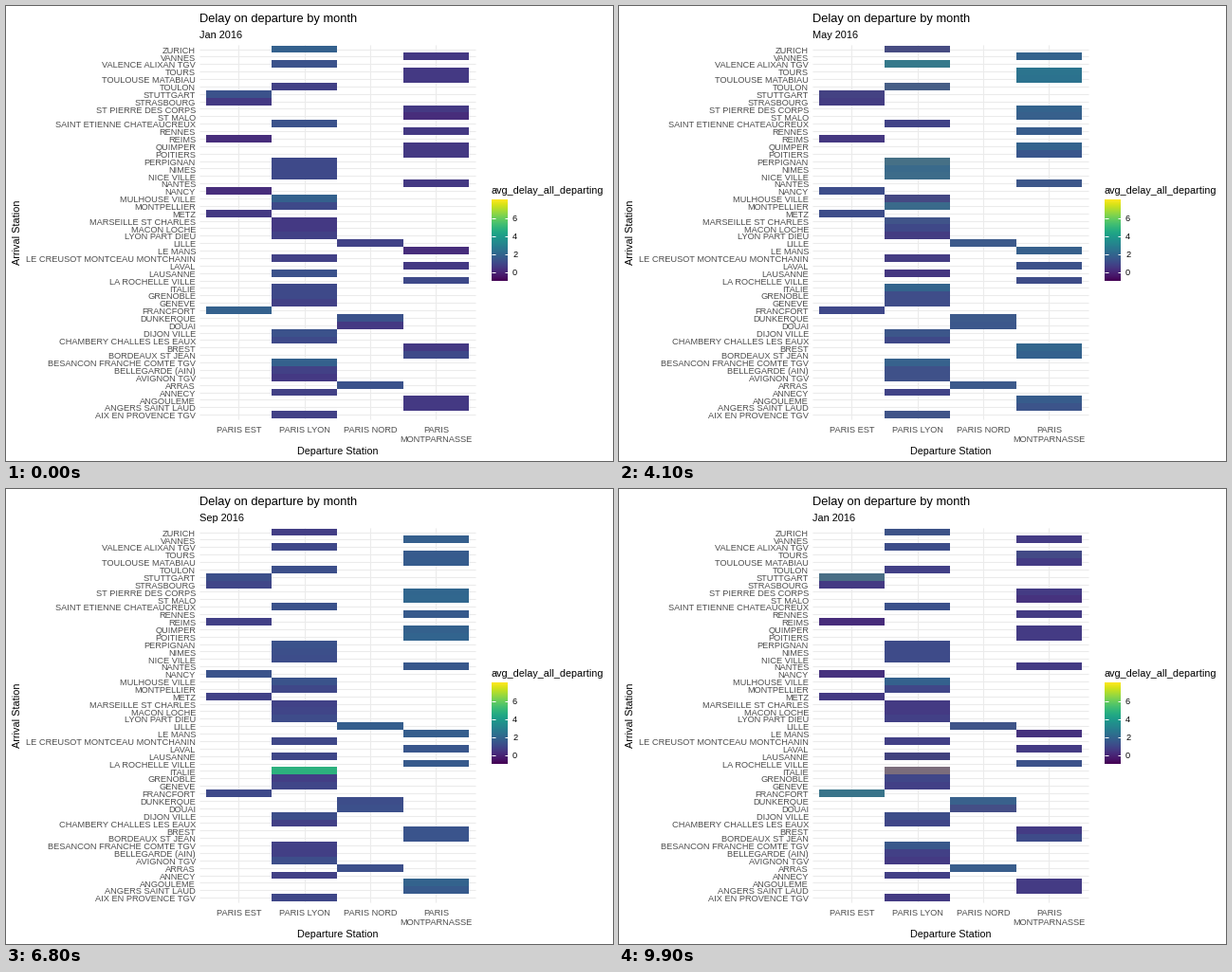
Animation, 640 px wide and 480 px high, one loop 10000 ms. Source, as a matplotlib script:

```python
import random

import matplotlib.pyplot as plt
import numpy as np
from matplotlib.animation import FuncAnimation
from matplotlib.collections import LineCollection, PatchCollection
from matplotlib.patches import Rectangle

W, H, DPI = 640, 480, 100
FRAMES, INTERVAL = 100, 100
PX = 72 / DPI
LOW, HIGH = -1.0, 8.1

MONTHS = "Jan Feb Mar Apr May Jun Jul Aug Sep Oct Nov Dec".split()
STARTS = [5, 14, 23, 32, *range(41, 98, 8)]  # first frame of each transition
STEPS = 4

DEPARTURES = [
    ("PARIS EST", "FRANCFORT,METZ,NANCY,REIMS,STRASBOURG,STUTTGART"),
    ("PARIS LYON",
     "AIX EN PROVENCE TGV,ANNECY,AVIGNON TGV,BELLEGARDE (AIN),"
     "BESANCON FRANCHE COMTE TGV,CHAMBERY CHALLES LES EAUX,DIJON VILLE,"
     "GENEVE,GRENOBLE,ITALIE,LAUSANNE,LE CREUSOT MONTCEAU MONTCHANIN,"
     "LYON PART DIEU,MACON LOCHE,MARSEILLE ST CHARLES,MONTPELLIER,"
     "MULHOUSE VILLE,NICE VILLE,NIMES,PERPIGNAN,"
     "SAINT ETIENNE CHATEAUCREUX,TOULON,VALENCE ALIXAN TGV,ZURICH"),
    ("PARIS NORD", "ARRAS,DOUAI,DUNKERQUE,LILLE"),
    ("PARIS\nMONTPARNASSE",
     "ANGERS SAINT LAUD,ANGOULEME,BORDEAUX ST JEAN,BREST,"
     "LA ROCHELLE VILLE,LAVAL,LE MANS,NANTES,POITIERS,QUIMPER,RENNES,"
     "ST MALO,ST PIERRE DES CORPS,TOULOUSE MATABIAU,TOURS,VANNES"),
]
COLUMN = {s: c for c, (_, names) in enumerate(DEPARTURES)
          for s in names.split(",")}
STATIONS = sorted(COLUMN)

# usual delay per departure station, then the arrivals that differ
DELAYS = {
    "Jan": ((.5, .75, .8, .5), {
        1.8: "ZURICH,MULHOUSE,BESANCON,FRANCFORT",
        1.3: "VALENCE,STUTTGART,SAINT,LAUSANNE,DIJON,DUNKERQUE,ARRAS",
        1.0: "PERPIGNAN,NIMES,NICE,MONTPELLIER,CHAMBERY,GRENOBLE,ITALIE,"
             "LA ROCHELLE,BORDEAUX",
        .5: "MARSEILLE,DOUAI,AVIGNON,MACON",
        .15: "REIMS,NANCY,ST MALO,LE MANS"}),
    "Mar": ((1.5, .4, 2.2, 1.2), {
        2.5: "TOULOUSE,DUNKERQUE",
        1.9: "ITALIE,LA ROCHELLE",
        1.7: "LILLE,DOUAI,NANCY,METZ",
        1.2: "ZURICH,VALENCE,STUTTGART,STRASBOURG,PERPIGNAN,NIMES,CHAMBERY",
        .7: "NICE,FRANCFORT,GRENOBLE,MULHOUSE,MONTPELLIER",
        .15: "SAINT,LAUSANNE,ANNECY"}),
    "May": ((.35, .8, 1.05, 1.4), {
        2.5: "TOURS,TOULOUSE",
        2.0: "VALENCE,ITALIE",
        1.7: "ST PIERRE,BREST,BORDEAUX,VANNES,QUIMPER",
        1.45: "PERPIGNAN,NIMES,NICE,MONTPELLIER,BESANCON",
        1.0: "NANCY,METZ,FRANCFORT,DIJON,LAVAL,ANGERS,NANTES",
        .3: "ZURICH,MULHOUSE,LYON,LE CREUSOT,LAUSANNE"}),
    "Jun": ((1.5, 2.7, 3.2, 2.4), {
        5.5: "PERPIGNAN",
        4.75: "VALENCE,TOULON,NICE",
        4.3: "NIMES,MONTPELLIER",
        3.8: "ZURICH",
        3.15: "MULHOUSE,MARSEILLE,BESANCON,AIX",
        2.85: "LE MANS,BREST,ST MALO,NANTES,DOUAI",
        2.15: "STUTTGART,GRENOBLE,GENEVE,TOULOUSE,BORDEAUX,LAVAL",
        1.55: "MACON,LYON,LE CREUSOT,ITALIE,CHAMBERY,POITIERS",
        .85: "SAINT,REIMS,LAUSANNE,FRANCFORT,ANNECY",
        .2: "LA ROCHELLE"}),
    "Jul": ((.95, 1.35, 1.5, 1.25), {
        5.1: "ITALIE",
        4.3: "GRENOBLE",
        3.6: "CHAMBERY",
        2.8: "ARRAS",
        2.25: "TOULOUSE,TOULON,PERPIGNAN,NIMES,NICE",
        1.75: "ZURICH,VALENCE,MARSEILLE,AIX,BREST,BORDEAUX,MONTPELLIER,"
              "DUNKERQUE",
        1.3: "STUTTGART",
        .9: "MACON,LYON,AVIGNON,ANNECY",
        .5: "TOURS,REIMS,METZ,LE CREUSOT,LAUSANNE"}),
    "Aug": ((.8, 1.0, 1.1, 1.3), {1.8: "ITALIE,GRENOBLE,CHAMBERY"}),
    "Sep": ((1.0, 1.0, 1.4, 1.7), {4.8: "ITALIE"}),
    "Oct": ((1.4, 1.2, 2.6, 2.1), {3.3: "FRANCFORT,TOULOUSE,TOURS"}),
    "Nov": ((1.4, 1.1, .3, 2.3), {
        3.5: "TOULOUSE",
        3.1: "TOURS",
        2.7: "NANTES,LE MANS,LA ROCHELLE,ANGERS",
        2.3: "GRENOBLE",
        1.9: "FRANCFORT,LAVAL,ANGOULEME",
        1.65: "TOULON,SAINT,NICE,AIX",
        1.4: "PERPIGNAN,NIMES,MONTPELLIER,MARSEILLE,LYON",
        .8: "LILLE,LE CREUSOT,CHAMBERY,ANNECY,BELLEGARDE",
        .45: "METZ,ITALIE",
        .1: "REIMS"}),
    "Dec": ((.6, .6, 3.4, .8), {
        8.1: "ITALIE",
        5.6: "STUTTGART",
        4.8: "FRANCFORT",
        2.8: "TOURS,ARRAS",
        2.2: "LA ROCHELLE",
        1.8: "MULHOUSE",
        1.2: "PERPIGNAN,NIMES,NICE,SAINT,BORDEAUX",
        0: "ZURICH,AIX,REIMS",
        -.9: "LAUSANNE"}),
}
JITTERY = {"Aug", "Sep", "Oct"}


def month_delays(month, rng):
    usual, special = DELAYS[month]
    spread = .35 if month in JITTERY else 0
    out = []
    for s in STATIONS:
        value = usual[COLUMN[s]] + rng.uniform(-spread, spread)
        for level, names in special.items():
            if s.startswith(tuple(names.split(","))):
                value = level
        out.append(value)
    return np.array(out)


def all_delays():
    rng = random.Random(16)
    table = {m: month_delays(m, rng) for m in DELAYS}
    for before, month, after in (("Jan", "Feb", "Mar"), ("Mar", "Apr", "May")):
        noise = np.array([rng.uniform(-.2, .2) for _ in STATIONS])
        table[month] = .35 * table[before] + .65 * table[after] + noise
    return [table[m] for m in MONTHS]


# colours blend in CIE Lab
TO_XYZ = np.array([[.4124, .3576, .1805],
                   [.2126, .7152, .0722],
                   [.0193, .1192, .9505]])
WHITE = TO_XYZ.sum(axis=1)
TO_LAB = np.array([[0, 116, 0], [500, -500, 0], [0, 200, -200]])


def rgb_to_lab(rgb):
    lin = np.where(rgb > .04045, ((rgb + .055) / 1.055) ** 2.4, rgb / 12.92)
    xyz = lin @ TO_XYZ.T / WHITE
    f = np.where(xyz > .008856, np.cbrt(xyz), 7.787 * xyz + 16 / 116)
    return f @ TO_LAB.T - [16, 0, 0]


def lab_to_rgb(lab):
    f = (lab + [16, 0, 0]) @ np.linalg.inv(TO_LAB).T
    xyz = np.where(f > .2069, f ** 3, (f - 16 / 116) / 7.787) * WHITE
    lin = np.clip(xyz @ np.linalg.inv(TO_XYZ).T, 0, 1)
    rgb = np.where(lin > .0031308, 1.055 * lin ** (1 / 2.4) - .055, 12.92 * lin)
    return np.clip(rgb, 0, 1)


def fill(values):
    return plt.cm.viridis((values - LOW) / (HIGH - LOW))[:, :3]


SHADES = [rgb_to_lab(fill(v)) for v in all_delays()]

plt.rcParams["font.family"] = "Liberation Sans"
fig = plt.figure(figsize=(W / DPI, H / DPI), dpi=DPI, facecolor="white")
ax = fig.add_axes([0, 0, 1, 1])


def label(x, y, text, size, color="black", **kw):
    return ax.text(x, y, text, fontsize=size * PX, color=color,
                   va="baseline", **kw)


# panel
LEFT, RIGHT, TOP, BOTTOM = 204, 495, 40.7, 435.8
ROW_H, COL_W = 7.87, 69.3
TILE_X, TILE_Y = 210.8, 435.1
GREY = "#4D4D4D"


def row_y(i):
    return TILE_Y - (i + .5) * ROW_H


def col_x(c):
    return TILE_X + (c + .5) * COL_W


grid = [[(LEFT, row_y(i)), (RIGHT, row_y(i))] for i in range(len(STATIONS))]
grid += [[(col_x(c), TOP), (col_x(c), BOTTOM)] for c in range(4)]
for (xa, ya), (xb, yb) in grid:
    ax.plot([xa, xb], [ya, yb], color="#EBEBEB", lw=1.07 * PX, zorder=1,
            solid_capstyle="butt")

tiles = []
for i, s in enumerate(STATIONS):
    x0 = round(TILE_X + COLUMN[s] * COL_W)
    x1 = round(TILE_X + (COLUMN[s] + 1) * COL_W)
    y0, y1 = round(TILE_Y - (i + 1) * ROW_H), round(TILE_Y - i * ROW_H)
    tiles.append(Rectangle((x0, y0), x1 - x0, y1 - y0))
    label(200, row_y(i) + 4.2, s, 9.25, GREY, ha="right")
heat = PatchCollection(tiles, linewidths=0, edgecolors="none",
                       antialiaseds=False, zorder=2)
ax.add_collection(heat)

for c, (name, _) in enumerate(DEPARTURES):
    for k, line in enumerate(name.split("\n")):
        label(col_x(c), 450 + 10 * k, line, 9.25, GREY, ha="center")

label(204, 17, "Delay on departure by month", 12.85)
subtitle = label(204, 34, "", 11)
label(349.5, 473, "Departure Station", 10.8, ha="center")
label(15.5, 238.5, "Arrival Station", 10.9, ha="center", rotation=90,
      rotation_mode="anchor")

# legend
label(512, 198, "avg_delay_all_departing", 10.75)
ax.imshow(np.linspace(1, 0, 256)[:, None], cmap="viridis", aspect="auto",
          extent=(512, 529, 290, 204), interpolation="bilinear", zorder=2)
ticks = []
for value in (0, 2, 4, 6):
    y = 281.4 - 9.5 * value
    ticks += [[(512, y), (515.5, y)], [(525.5, y), (529, y)]]
    label(534, y + 3, str(value), 9.2)
ax.add_collection(LineCollection(ticks, colors="white", linewidths=PX,
                                 zorder=3))

ax.set_xlim(0, W)
ax.set_ylim(H, 0)
ax.axis("off")


def draw(frame):
    begun = sum(s <= frame for s in STARTS)
    if begun:
        now, t = begun - 1, min((frame - STARTS[begun - 1] + 1) / STEPS, 1)
    else:
        now, t = 11, 1
    after = (now + 1) % 12
    heat.set_facecolor(lab_to_rgb((1 - t) * SHADES[now] + t * SHADES[after]))
    subtitle.set_text(MONTHS[after if t >= .5 else now] + " 2016")
    return heat, subtitle


anim = FuncAnimation(fig, draw, frames=FRAMES, interval=INTERVAL,
                     init_func=lambda: draw(0), repeat=True, repeat_delay=0)
plt.show()
```
